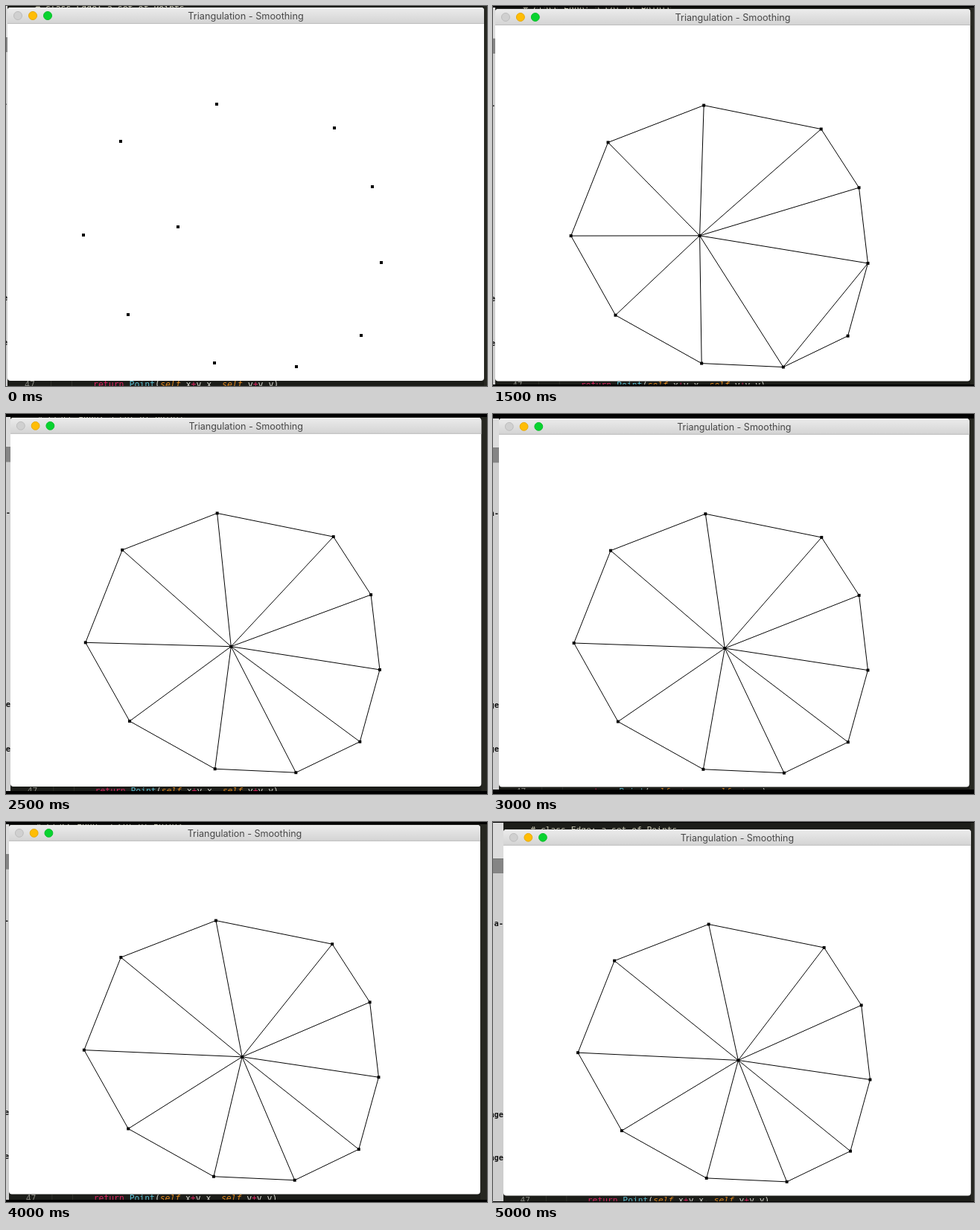
An HTML page with a canvas that plays this animation: 646x511 px, repeating every 5.5 s.

```html
<!DOCTYPE html>
<html>
<head>
<meta charset="utf-8">
<style>
html, body { margin: 0; width: 100%; height: 100%; overflow: hidden; background: #000; }
canvas { display: block; }
</style>
</head>
<body>
<canvas id="stage" width="646" height="511"></canvas>
<script>
const ctx = document.getElementById('stage').getContext('2d');
const STEP = 500;

// One camera per step: window left, top, scale; visible band top, bottom
const cameras = [
  [2, 2, 1, 0, 511],
  [5, 5, .994, 1, 509],
  [4, 4.5, .9955, 2, 509],
  [3, 4, .997, 2, 509],
  [5, 5, .99, 5, 506],
  [6, 5, .988, 4, 507],
  [8, 6, .987, 6, 505],
  [6, 4, .99, 3, 508],
  [4, 4, .989, 3, 508],
  [9, 7, .985, 2, 509],
  [14, 10, .981, 1, 510]
];

const ring = [[152, 180], [281, 130], [439, 162], [490, 241], [502, 343],
  [475, 441], [388, 483], [278, 478], [162, 413], [102, 306]];
const start = [229, 295];
const mean = [0, 1].map(k => ring.reduce((sum, p) => sum + p[k], 0) / ring.length);

const MONO = '"DejaVu Sans Mono", monospace';

function rect(color, x, y, w, h) {
  ctx.fillStyle = color;
  ctx.fillRect(x, y, w, h);
}

function text(str, x, y, color, font, align = 'left') {
  ctx.font = font;
  ctx.textAlign = align;
  ctx.fillStyle = color;
  ctx.fillText(str, x, y);
}

function line(a, b) {
  ctx.beginPath();
  ctx.moveTo(...a);
  ctx.lineTo(...b);
  ctx.stroke();
}

function code(tokens, x, y) {
  for (const [str, color, style = ''] of tokens) {
    text(str, x, y, color, `${style} 11.5px ${MONO}`);
    x += ctx.measureText(str).width;
  }
}

function drawDesktop() {
  rect('#1c1d19', -20, -20, 690, 550);
  rect('#262721', 640, -20, 30, 550);
  for (const x of [58, 86]) rect('#30312b', x, 502, 1, 20);

  code([['16', '#85867f']], 23, -9.5);
  code([['# class Edge: a set of Points', '#c9c8b4']], 37, 4.5);

  const white = '#d8d8d0', pink = '#d8215f', orange = '#dd851c';
  const self = ['self', orange, 'italic'];
  code([['47', '#85867f']], 23, 511.4);
  code([['return ', pink], ['Point', '#58b9cc'], ['(', white],
    self, ['.x', white], ['+', pink], ['v.x, ', white],
    self, ['.y', white], ['+', pink], ['v.y)', white]], 115, 511.4);

  rect('#dcdcdc', -20, -20, 20, 60);
  rect('#858585', -20, 40, 20, 20);
  rect('#cecece', -20, 60, 20, 470);
  const label = (str, y) => text(str, 0, y, '#111', `bold 10.5px ${MONO}`, 'right');
  label('-a-', 133);
  label('age', 394);
  label('age', 454);
}

function drawWindow() {
  ctx.fillStyle = '#fff';
  ctx.beginPath();
  ctx.roundRect(0, 0, 640, 502, 4);
  ctx.fill();

  const shade = ctx.createLinearGradient(0, 0, 0, 22);
  shade.addColorStop(0, '#ececec');
  shade.addColorStop(1, '#d3d3d3');
  ctx.fillStyle = shade;
  ctx.beginPath();
  ctx.roundRect(0, 0, 640, 22, [4, 4, 0, 0]);
  ctx.fill();
  rect('#bdbdbd', 0, 21, 640, 1);

  [['#d0d0d0', '#bcbcbc'], ['#ffbd05', '#e5a80a'], ['#08d32f', '#0bbd2c']].forEach(([fill, edge], i) => {
    ctx.beginPath();
    ctx.arc(14 + 20 * i, 11, 5.5, 0, 7);
    ctx.fillStyle = fill;
    ctx.fill();
    ctx.strokeStyle = edge;
    ctx.stroke();
  });
  text('Triangulation - Smoothing', 320, 16, '#484848', '12.7px Inter, sans-serif', 'center');
}

function drawMesh(step) {
  // The hub closes in on the mean of the ring by a fixed ratio per step
  const rest = .725 ** Math.max(0, step - 1);
  const hub = mean.map((m, k) => m + (start[k] - m) * rest);
  ctx.strokeStyle = '#000';
  if (step > 0) {
    ring.forEach((p, i) => {
      line(p, ring[(i + 1) % ring.length]);
      if (i !== 5 || step > 3) line(p, hub);
    });
    if (step <= 3) line(ring[4], ring[6]);
  }
  for (const [x, y] of [...ring, hub]) rect('#000', x - 2, y - 2, 4, 4);
}

function draw(now) {
  const step = Math.floor(now / STEP) % cameras.length;
  const [x, y, scale, top, bottom] = cameras[step];
  ctx.setTransform(1, 0, 0, 1, 0, 0);
  rect('#000', 0, 0, 646, 511);
  ctx.save();
  ctx.beginPath();
  ctx.rect(0, top, 646, bottom - top);
  ctx.clip();
  ctx.setTransform(scale, 0, 0, scale, x, y);
  ctx.lineWidth = 1;
  drawDesktop();
  drawWindow();
  drawMesh(step);
  ctx.restore();
}

const begin = performance.now();
function tick() {
  draw(performance.now() - begin);
  requestAnimationFrame(tick);
}
tick();
</script>
</body>
</html>
```
